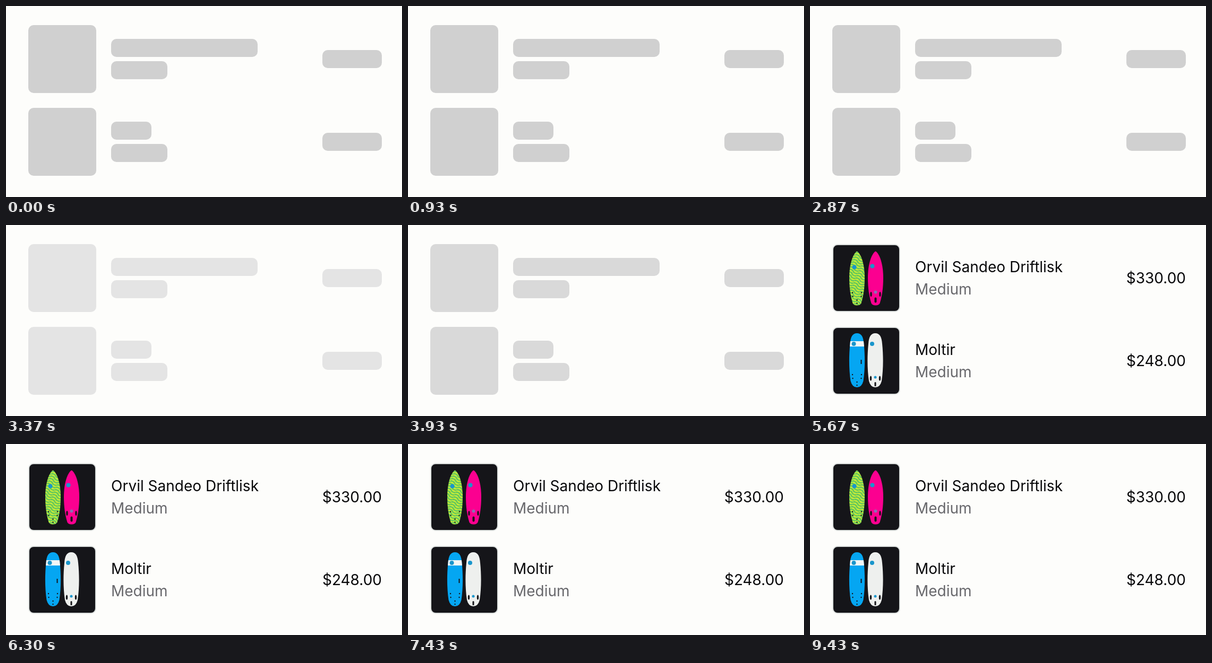
Recreate the animation shown at these times as an HTML page. Size 746 by 360 pixels, loop 9460 ms.

```html
<!DOCTYPE html>
<html lang="en">
<head>
<meta charset="utf-8">
<title>Loading order list</title>
<style>
  html, body { margin: 0; width: 100%; height: 100%; overflow: hidden; background: #fdfdfb; }
  svg { display: block; }
  text { font: 28px Inter, Roboto, sans-serif; fill: #08080a; }
  .size { fill: #68686c; }
  .tile { fill: #151519; stroke: #dce0de; stroke-width: 2; }
  .logo { fill: #1a96cc; }
  .dark { fill: #151519; }
</style>
</head>
<body>
<svg width="746" height="360" viewBox="0 0 746 360">
  <defs>
    <path id="fish" d="M0 0C8 5 14.5 25 14.5 50C14.5 70 12 85 8 98Q6 102 0 102Q-6 102 -8 98C-12 85 -14.5 70 -14.5 50C-14.5 25 -8 5 0 0Z"/>
    <path id="long" d="M0 0C8 0 12 6 13 20C15.5 45 15 70 12 90Q9 102 0 102Q-9 102 -12 90C-15 70 -15.5 45 -13 20C-12 6 -8 0 0 0Z"/>
    <clipPath id="longClip"><use href="#long"/></clipPath>
    <pattern id="waves" width="18" height="5" patternUnits="userSpaceOnUse" patternTransform="rotate(24)">
      <rect width="18" height="5" fill="#c4ea3a"/>
      <path d="M0 2.5Q4.5 -1.5 9 2.5T18 2.5" fill="none" stroke="#52c162" stroke-width="2.2"/>
    </pattern>
    <g id="fins" class="dark">
      <ellipse cx="-8.5" cy="81" rx="1.7" ry="4.5"/>
      <ellipse cx="8.5" cy="81" rx="1.7" ry="4.5"/>
    </g>
    <g id="plugs" class="dark">
      <circle cx="-8.5" cy="78" r="1.2"/><circle cx="8.5" cy="78" r="1.2"/>
      <circle cx="-8" cy="85" r="1.2"/><circle cx="8" cy="85" r="1.2"/>
      <circle cx="0" cy="92" r="1.2"/><circle cx="0" cy="98" r="1.2"/>
    </g>
  </defs>

  <g id="bones"></g>

  <g id="content">
    <rect class="tile" x="43" y="37" width="126" height="126" rx="9"/>
    <g transform="translate(88.5 49.5)">
      <use href="#fish" fill="url(#waves)"/>
      <circle class="logo" cx="-5" cy="30" r="4"/>
      <use href="#plugs"/>
    </g>
    <g transform="translate(123.5 49.5)">
      <use href="#fish" fill="#fb0090"/>
      <circle class="logo" cx="-6" cy="28" r="4"/>
      <circle cx="0" cy="77" r="3" fill="#8a6fb4"/>
      <use href="#fins"/>
      <rect class="dark" x="-2" y="87" width="4" height="10" rx="2"/>
    </g>
    <text x="198" y="88.5">Orvil Sandeo Driftlisk</text>
    <text x="198" y="130.5" class="size">Medium</text>
    <text x="708" y="109.5" text-anchor="end">$330.00</text>

    <rect class="tile" x="43" y="193" width="126" height="126" rx="9"/>
    <g transform="translate(88.5 204)">
      <use href="#long" fill="#05a6f2"/>
      <rect x="-16" y="15" width="32" height="10" fill="#f4f6f6" clip-path="url(#longClip)"/>
      <circle class="logo" cx="-6" cy="20" r="4"/>
      <rect class="dark" x="7" y="50" width="2" height="8"/>
      <use href="#plugs"/>
    </g>
    <g transform="translate(123 204)">
      <use href="#long" fill="#eef0ee"/>
      <circle class="logo" cx="-6" cy="20" r="4"/>
      <circle class="logo" cx="0" cy="83" r="2.5"/>
      <use href="#fins" y="4"/>
      <rect class="dark" x="-1.5" y="92" width="3" height="8" rx="1.5"/>
    </g>
    <text x="198" y="244.5">Moltir</text>
    <text x="198" y="286.5" class="size">Medium</text>
    <text x="708" y="265.5" text-anchor="end">$248.00</text>
  </g>
</svg>
<script>
  const LOOP = 9460, LOADED = 5670;
  const DARK = 208, LIGHT = 228;
  const bones = document.getElementById('bones');
  const content = document.getElementById('content');

  const bone = (x, y, w, h) => `<rect x="${x}" y="${y}" width="${w}" height="${h}" rx="10"/>`;
  bones.innerHTML = [[36, 276], [192, 76]].map(([y, titleWidth]) =>
    bone(42, y, 128, 128) + bone(198, y + 26, titleWidth, 34) +
    bone(198, y + 68, 106, 34) + bone(596, y + 47, 112, 34)).join('');

  const easeOut = (t, from, to) => {
    const p = Math.min(1, Math.max(0, (t - from) / (to - from)));
    return Math.sin(p * Math.PI / 2);
  };

  function draw(now) {
    const t = now % LOOP;
    const loaded = t >= LOADED;
    const pulse = easeOut(t, 3000, 3370) - easeOut(t, 3800, 4140);
    const gray = Math.round(DARK + (LIGHT - DARK) * pulse);
    bones.setAttribute('fill', `rgb(${gray}, ${gray}, ${gray})`);
    bones.style.display = loaded ? 'none' : '';
    content.style.display = loaded ? '' : 'none';
  }

  const start = performance.now();
  function tick() {
    draw(performance.now() - start);
    requestAnimationFrame(tick);
  }
  tick();
</script>
</body>
</html>
```
